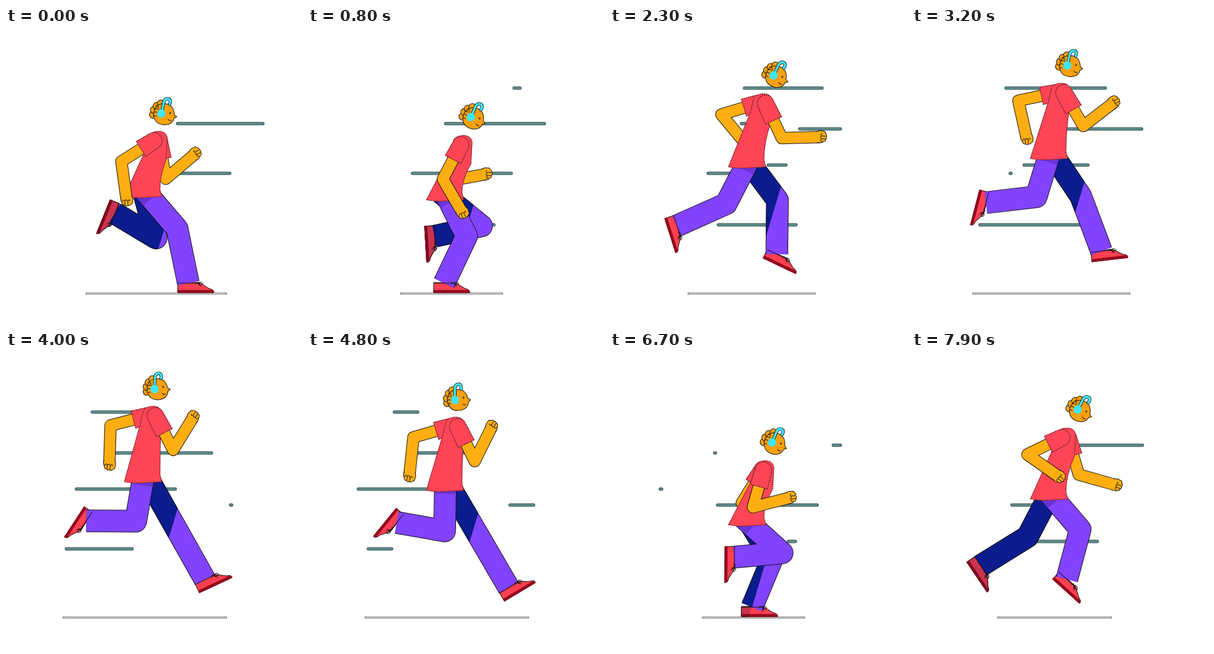
Write an HTML page with a canvas that moves like this. It is 500 by 500 pixels and loops after 8 s.

```html
<!DOCTYPE html>
<html lang="en">
<head>
<meta charset="utf-8">
<title>Runner</title>
<style>
html, body { margin: 0; width: 500px; height: 500px; overflow: hidden; background: #fff; }
canvas { display: block; }
</style>
</head>
<body>
<canvas id="stage" width="500" height="500"></canvas>
<script>
const ctx = document.getElementById('stage').getContext('2d');
const LOOP = 8000, STEP = 6000, STRIDE = 2 * STEP;
const INK = '#111', SHIRT = '#ff4556', SKIN = '#ffae12', HAIR = '#f9a00c', PHONES = '#3fe6fb';
const LIT = { cloth: '#8243ff', shoe: '#ff4052', sole: '#960a1c' };
const SHADE = { cloth: '#0b1c8e', shoe: '#c93350', sole: '#7d0a1c' };
const FLOOR = 431;

// Closed path of an ankle over one stride: time, x, y
const ANKLE = [
  [0, 308, 431], [700, 240, 431], [1500, 160, 421], [1900, 116, 361], [3200, 125, 295],
  [4800, 150, 288], [6000, 184, 313], [7500, 243, 380], [9200, 320, 377], [10800, 339, 398]
];
// Speed lines: y, right end, start time
const STREAKS = [
  [161.5, 436, -2050], [245.5, 380, -2050], [101.5, 360, 395], [332.5, 316, 395],
  [170.5, 391, 1055], [231.5, 299, 1540], [258.5, 383, 3900], [157.5, 391, 6250], [320, 315, 6250]
];

const rad = degrees => degrees * Math.PI / 180;
const clamp = u => Math.min(1, Math.max(0, u));
const ease = u => (u = clamp(u)) * u * (3 - 2 * u);
// Cosine of a time within a period, peaking at the given angle
const wave = (t, period, peak, harmonic = 1) =>
  Math.cos(harmonic * t / period * 2 * Math.PI - rad(peak));

function anklePoint(time) {
  const n = ANKLE.length, t = time % STRIDE;
  const i = ANKLE.findLastIndex(p => p[0] <= t);
  const [a, b, c, d] = [-1, 0, 1, 2].map(k => {
    const turn = Math.floor((i + k) / n), p = ANKLE[i + k - turn * n];
    return [p[0] + turn * STRIDE, p[1], p[2]];
  });
  const span = c[0] - b[0], u = (t - b[0]) / span;
  const slope = (p, q, r, k) =>
    p[k] === q[k] || q[k] === r[k] ? 0 : (r[k] - p[k]) / (r[0] - p[0]) * span;
  return [1, 2].map(k => b[k] + (c[k] - b[k]) * ease(u)
    + slope(a, b, c, k) * u * (1 - u) ** 2 - slope(b, c, d, k) * u * u * (1 - u));
}

function pose(t) {
  const y = 146 + 47 * wave(t, STEP, 32.6) + 8.5 * wave(t, STEP, 54, 2);
  return { x: 255.5 + 7.5 * wave(t, STEP, 75), y, hem: 0.79 * y + 134, sway: wave(t, STEP, 96) };
}

function line(points, width, color, cap = 'butt') {
  ctx.beginPath();
  points.forEach(p => ctx.lineTo(...p));
  ctx.lineJoin = 'round';
  ctx.lineCap = cap;
  ctx.lineWidth = width;
  ctx.strokeStyle = color;
  ctx.stroke();
}

function limb(points, width, color) {
  line(points, width + 1, INK);
  line(points, width - 1, color);
}

function shape(path, fill, stroke = INK) {
  const p = new Path2D(path);
  ctx.lineWidth = 1;
  ctx.strokeStyle = stroke;
  if (fill) { ctx.fillStyle = fill; ctx.fill(p); }
  ctx.stroke(p);
}

function disc(x, y, r, fill, stroke) {
  const p = new Path2D();
  p.arc(x, y, r, 0, 7);
  shape(p, fill, stroke);
}

function placed(x, y, angle, draw) {
  ctx.save();
  ctx.translate(x, y);
  ctx.rotate(angle);
  draw();
  ctx.restore();
}

function dashedShirt(path) {
  shape(path, SHIRT, SHIRT);
  ctx.setLineDash([2, 1.5]);
  shape(path);
  ctx.setLineDash([]);
}

function streak(t, [y, right, start]) {
  const age = t - start;
  if (age <= 0 || age > 5700) return;
  const at = delay => right - 3 - 211 * ease((age - delay) / 3300);
  const points = [[at(0), y], [at(2000) + 1, y]];
  line(points, 5.5, '#263c3c', 'round');
  line(points, 3.8, '#5f8c8c', 'round');
}

// The ground strip shrinks quickly at each landing and grows back
function ground(t) {
  const s = (t + 450) % STEP, regrow = ease((s - 1650) / 2500);
  const left = 96 + 60 * (ease(s / 750) - regrow);
  const right = 373 - 44 * (ease((s - 450) / 700) - regrow);
  line([[left, 448.5], [right, 448.5]], 3.6, '#555');
  line([[left + 1, 448.5], [right - 1, 448.5]], 2.4, '#c4c4c4');
}

function leg(phase, hem, look, hemShade) {
  const [ax, footY] = anklePoint(phase), ay = Math.min(FLOOR, footY);
  const hx = 236 + 0.05 * (ax - 231), hy = hem - 3;
  // The knee bulges forward as the hip and ankle come closer
  const reach = Math.hypot(ax - hx, ay - hy), ux = (ax - hx) / reach, uy = (ay - hy) / reach;
  const down = 0.48 * reach - 6, out = 80 * Math.max(0, 1 - (reach / 191) ** 2);
  const kx = hx + ux * down + uy * out, ky = hy + uy * down - ux * out;
  const thigh = Math.hypot(kx - hx, ky - hy);
  const along = d => [hx + (kx - hx) * d / thigh, hy + (ky - hy) * d / thigh];
  // The sole lies flat while the foot is on the floor
  const turn = rad(49 + 80 * wave(phase, STRIDE, 142)) * clamp((FLOOR - ay) / 9);

  placed(ax, ay, turn, () => {
    shape('M-18 -1V16H43Q44 11 35 9L19 -1Z', look.shoe);
    shape('M-18 12V16H43L42 12Z', look.sole, look.sole);
  });
  limb([along(-14), [kx, ky], [ax, ay]], 37, look.cloth);
  if (hemShade) line([along(-14), along(9)], 36, '#6a32d6');
  placed(ax, ay, turn, () => {
    shape('M-18 0H19');
    shape('M12 2q0-5 4-3t2 5m-2-4q5-4 8 0t-8 1m2 1l4 4');
  });
}

function arm(phase, { x, y }) {
  const upper = rad(-24 + 60 * wave(phase, STRIDE, 115) - 8.3 * wave(phase, STRIDE, 0, 3));
  const fore = rad(69 + 80 * wave(phase, STRIDE, 140) - 5 * wave(phase, STRIDE, 90, 2));
  const swing = Math.sin(upper), sx = x + 9 * swing;
  const ex = sx + 65 * swing, ey = y + 65 * Math.cos(upper);
  const wx = ex + 64 * Math.sin(fore), wy = ey + 64 * Math.cos(fore);
  const sleeve = 30 + 5 * swing;

  limb([[sx, y], [ex, ey], [wx, wy]], 19.5, SKIN);
  placed(wx, wy, Math.PI / 2 - fore, () => {
    shape('M-5 -9Q0 -12 5 -10Q10 -10 10 -6Q13 -4 11 -1Q13 2 10 4Q10 8 6 8Q2 11 -5 9', SKIN);
    shape('M4 -6q-4 2 0 4l6 1m-6 0q-5 1-1 4l7 1m-7-1q-4 3 1 5');
  });
  placed(sx, y, Math.PI / 2 - upper, () =>
    dashedShirt(`M${sleeve} -15L0 -14A14 14 0 0 0 0 14L${sleeve} 15Z`));
}

function torso({ x, y, hem }) {
  dashedShirt(`M200 ${hem}L${x - 22} ${y + 16}L${x - 16} ${y - 9}
    Q${x - 12} ${y - 15} ${x - 2} ${y - 16}Q${x + 13} ${y - 17} ${x + 15} ${y - 5}
    L${x + 13} ${y + 32}Q260 ${(y + hem) / 2 + 12} 260 ${hem - 12}L263 ${hem}
    Q248 ${hem + 1} 231 ${hem + 2}T200 ${hem}Z`);
}

function head({ y, sway }) {
  placed(269 + 16 * sway, y - 45, rad(2 + 15 * sway), () => {
    for (let i = 0; i < 4; i++) {
      const a = rad(177 + 25 * i);
      disc(19 * Math.cos(a), 19 * Math.sin(a), 6, HAIR);
    }
    shape('M13 -12Q17 -6 17 1L21 4Q20 6 17 6Q14 18 0 18Q-16 17 -18 2Q-18 -16 -2 -18Q8 -18 13 -12Z', HAIR);
    shape('M-16 -8q5-3 7 1m-8 4q4-2 6 2m-3-13q4 0 5 4m-9 14q3-3 5 0M6 8q2 4 6 2');
    disc(10, -2, 1, '#fff');
    const band = new Path2D('M-4 -5L-1 -20Q1 -27 7 -26Q12 -24 9 -17');
    ctx.lineCap = 'round';
    for (const [width, color] of [[5.5, INK], [3.8, PHONES]]) {
      ctx.lineWidth = width;
      ctx.strokeStyle = color;
      ctx.stroke(band);
    }
    disc(-5, -1, 6.5, PHONES, PHONES);
  });
}

function draw(t) {
  const body = pose(t), far = t + STEP;
  ctx.fillStyle = '#fff';
  ctx.fillRect(0, 0, 500, 500);
  STREAKS.forEach(s => streak(t, s));
  ground(t);
  arm(far, body);
  leg(far, body.hem, LIT);
  // Everything of the far leg left of a fixed slanted line is in shadow
  ctx.save();
  ctx.clip(new Path2D('M0 0H369L219 500H0Z'));
  leg(far, body.hem, SHADE);
  ctx.restore();
  leg(t, body.hem, LIT, true);
  torso(body);
  arm(t, body);
  head(body);
}

const begin = performance.now();
function tick() {
  const t = performance.now() - begin;
  draw(Math.floor(t / 100) * 100 % LOOP);
  requestAnimationFrame(tick);
}
tick();
</script>
</body>
</html>
```
